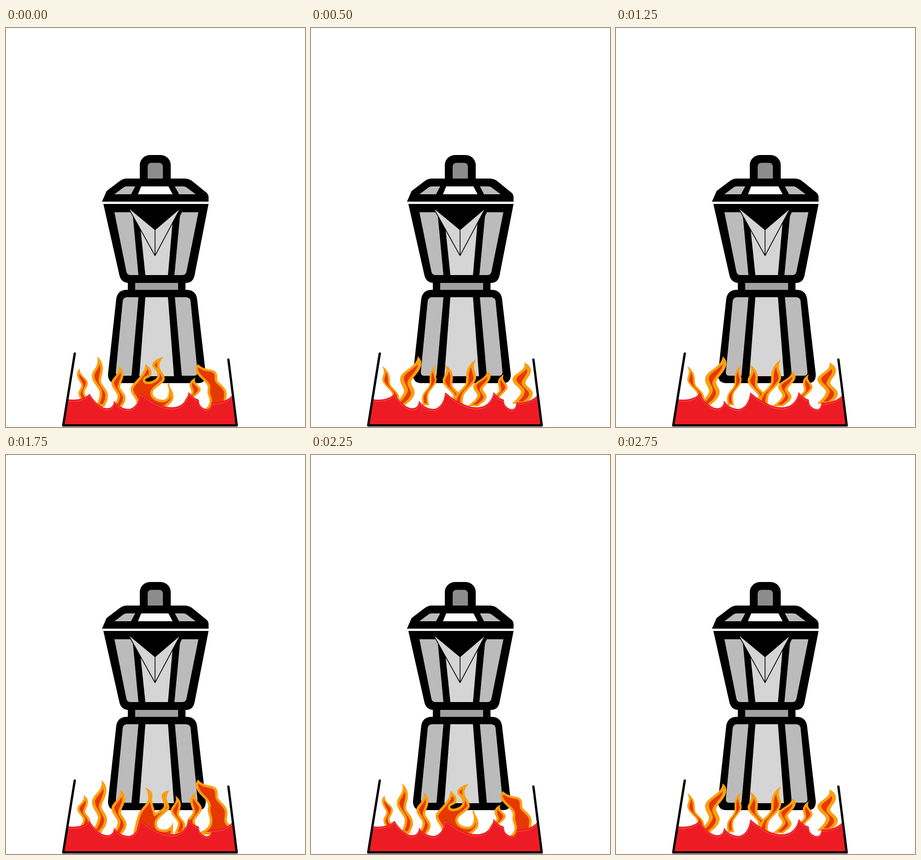
An HTML page without scripts that plays this animation: 648x864 px, repeating every 3 s.

```html
<!DOCTYPE html>
<html lang="en">
<head>
<meta charset="utf-8">
<title>Coffee pot on the fire</title>
<style>
  html, body { margin: 0; width: 100%; height: 100%; overflow: hidden; background: #fff; }
  svg { display: block; width: 100%; height: 100%; }
  .mid { fill: #bbb; }
  .light { fill: #d5d5d5; }
  /* red fire with an orange rim; the clip keeps the rim inside the outline */
  .pose { fill: #e63900; stroke: #fa9f0f; stroke-width: 11; animation: flicker 750ms step-end infinite; }
  [href="#wisp"] { clip-path: url(#in-wisp); }
  [href="#plume"] { clip-path: url(#in-plume); }
  [href="#curl"] { clip-path: url(#in-curl); }
  [href="#fork"] { clip-path: url(#in-fork); }
  clipPath use { clip-path: none; }
  .second { animation-delay: -500ms; }
  .third { animation-delay: -250ms; }
  @keyframes flicker {
    0% { opacity: 1; }
    33.333%, 100% { opacity: 0; }
  }
</style>
</head>
<body>
<svg viewBox="0 0 648 864">
  <defs>
    <path id="wisp" d="M0 0C9 7 14 17 13 29S9 44 9 53 24 71 24 85 19 99 17 109H-3C3 97 6 89 6 79S-11 57-11 43 7 21 0 0Z"/>
    <path id="plume" d="M416 703C428 716 440 714 450 718S459 732 459 740 480 758 480 774 474 790 486 803L480 822H405C436 814 442 802 442 792S435 775 438 762 420 738 414 725 411 712 416 703Z"/>
    <path id="curl" d="M342 712C332 722 331 730 334 738S344 750 344 760 318 780 318 790 330 805 340 805 353 795 353 785 347 775 353 768C353 778 363 785 363 798S350 818 340 826H285C288 805 270 795 270 782S303 752 302 727C309 733 318 740 315 750S301 757 302 763 328 765 328 752 317 738 317 730 330 714 342 712Z"/>
    <path id="fork" d="M301 720C316 725 319 734 317 742S322 768 324 775C336 768 344 765 342 756S337 744 337 738 344 728 354 726C349 735 347 742 349 748S355 758 354 765 327 785 327 798 336 811 344 811 358 805 362 795V826H275C280 800 284 782 290 772S308 752 308 745 309 730 301 720Z"/>
    <clipPath id="in-wisp"><use href="#wisp"/></clipPath>
    <clipPath id="in-plume"><use href="#plume"/></clipPath>
    <clipPath id="in-curl"><use href="#curl"/></clipPath>
    <clipPath id="in-fork"><use href="#fork"/></clipPath>
  </defs>

  <g id="lid">
    <rect x="290" y="275" width="67" height="80" rx="22"/>
    <rect x="307" y="292" width="33" height="50" rx="8" fill="#8c8c8c"/>
    <path d="M208 376L218 353 247 331Q253 326 262 326H386Q396 326 403 331L435 357Q439 361 439 367V376Z"/>
    <path id="slope" class="mid" d="M235 360L255 345Q258 343 262 343H280L271 360Z"/>
    <use href="#slope" transform="translate(646) scale(-1 1)"/>
    <path fill="#fff" d="M293 343H352L361 360H286Z"/>
  </g>

  <g id="jug">
    <path d="M211 381H439L409 534Q406 552 390 552H264Q248 551 245 532Z"/>
    <path id="side" class="mid" d="M235 399H271L275 408 287 535H269Q263 535 261 528Z"/>
    <use href="#side" transform="translate(652) scale(-1 1)"/>
    <path class="light" d="M290 420H361L351 535H302Z"/>
    <path d="M267 390H378L323 437Z"/>
    <path class="light" stroke="#000" stroke-width="1.6" stroke-linejoin="bevel" d="M265 389L323 437V493ZM378 390L323 437V493Z"/>
  </g>

  <g id="base">
    <path d="M264 548H389V572H264Z"/>
    <path fill="#a0a0a0" d="M280 552H373V567H280Z"/>
    <path d="M260 567H393Q411 568 414 586L433 750Q433 769 417 769H237Q221 768 221 750L239 586Q242 568 260 567Z"/>
    <path id="foot" class="mid" d="M262 583H287L272 753H245Q238 753 238 745L253 591Q254 584 262 583Z"/>
    <use href="#foot" transform="translate(653) scale(-1 1)"/>
    <path class="light" d="M302 583H351L364 754H289Z"/>
  </g>

  <g class="pose">
    <use href="#wisp" transform="translate(160 737) skewX(16) scale(-.8 .68)"/>
    <use href="#wisp" transform="translate(197 711)"/>
    <use href="#wisp" transform="translate(244 731) skewX(-7) scale(1 .85)"/>
    <use href="#curl"/>
    <use href="#wisp" transform="translate(411 757) scale(-1 .6)"/>
    <use href="#plume" transform="translate(8 95) scale(.98 .9)"/>
  </g>

  <g class="pose second">
    <use href="#wisp" transform="translate(168 736) skewX(-7) scale(.9 .68)"/>
    <use href="#wisp" transform="translate(207 704) skewX(-10) scale(1.15 1.05)"/>
    <use href="#wisp" transform="translate(247 724) skewX(-9) scale(1.1 .92)"/>
    <use href="#fork"/>
    <use href="#wisp" transform="translate(367 738) scale(.9 .75)"/>
    <use href="#wisp" transform="translate(411 730) skewX(4) scale(-1 .8)"/>
    <use href="#plume"/>
  </g>

  <g class="pose third">
    <use href="#wisp" transform="translate(154 732) skewX(16) scale(.75)"/>
    <use href="#wisp" transform="translate(231 711) skewX(-26) scale(1.4 1)"/>
    <use href="#wisp" transform="translate(271 730) skewX(-11) scale(-.7 .8)"/>
    <use href="#wisp" transform="translate(290 729) skewX(10) scale(1 .85)"/>
    <use href="#wisp" transform="translate(358 717) skewX(-15) scale(-1 1)"/>
    <use href="#wisp" transform="translate(381 743) skewX(-27) scale(1.2 .7)"/>
    <use href="#wisp" transform="translate(418 750) skewX(-4) scale(-.9 .65)"/>
    <use href="#wisp" transform="translate(462 724) skewX(-14) scale(1.5 .82)"/>
  </g>

  <g id="tray">
    <g fill="#ed1c24">
      <path id="bath" d="M133 804Q165 808 181 792 195 815 212 822 232 828 234 807 246 824 266 825 286 822 291 789 315 810 342 819 387 830 396 788 404 801 418 805 418 820 432 825 444 828 445 811 474 812 490 796L500 861H124Z"/>
    </g>
    <use href="#bath" y="4" fill="none" stroke="#f7684c" stroke-width=".9"/>
    <path fill="none" stroke="#000" stroke-width="5" stroke-linecap="round" stroke-linejoin="round" d="M149 705L124 860.500H500L482 718"/>
  </g>
</svg>
</body>
</html>
```
